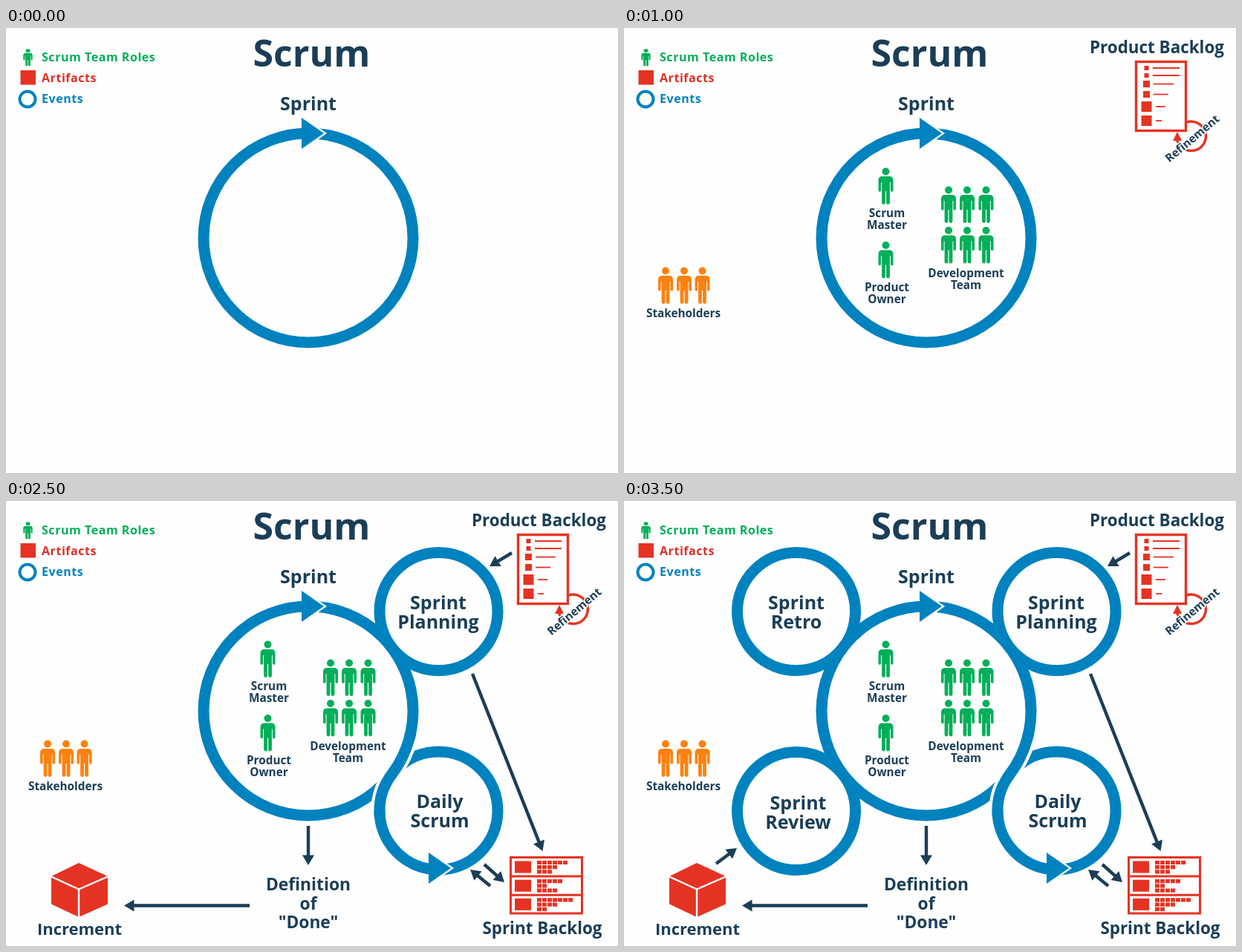
An HTML page that plays this animation: 824 by 600 pixels, repeating every 4 s.

```html
<!DOCTYPE html>
<html lang="en">
<head>
<meta charset="utf-8">
<title>Scrum</title>
<style>
  html, body { margin: 0; width: 100%; height: 100%; overflow: hidden; background: #fefefe; }
  svg { display: block; width: 824px; height: 600px; }
  text { font-family: "Open Sans", "Noto Sans", sans-serif; font-weight: 700; }
  .legend { letter-spacing: .55px; }
  .halo { paint-order: stroke; stroke: #fefefe; stroke-width: 3px; }
</style>
</head>
<body>
<svg id="stage" viewBox="0 0 824 600"></svg>
<script>
const WHITE = '#fefefe', BLUE = '#0082bf', DARK = '#1b3e57';
const GREEN = '#00af58', RED = '#e53323', ORANGE = '#fb8210';
const LOOP = 4000;

const text = (x, y, size, str) =>
  `<text x="${x}" y="${y}" font-size="${size}" fill="${DARK}" text-anchor="middle">${str}</text>`;

const legend = (y, str, fill) =>
  `<text class="legend" x="48" y="${y}" font-size="16" fill="${fill}">${str}</text>`;

const ring = (x, y, r, width = 15) =>
  `<circle cx="${x}" cy="${y}" r="${r}" fill="none" stroke="${BLUE}" stroke-width="${width}"/>`;

const rect = (x, y, w, h, attrs = `fill="${RED}"`) =>
  `<rect x="${x}" y="${y}" width="${w}" height="${h}" ${attrs}/>`;

const stroke = (d, color, width, extra = '') =>
  `<path d="${d}" fill="none" stroke="${color}" stroke-width="${width}" ${extra}/>`;

// Arrowhead lying on a ring, with a white gap in front of its tip.
const ringHead = (x, y) => [WHITE, BLUE].map((fill, i) =>
  `<path d="M${x + 4 - 4 * i} ${y - 21}l30 21l-30 21z" fill="${fill}"/>`).join('');

const person = (x, y, fill, scale = '1') =>
  `<g transform="translate(${x} ${y}) scale(${scale})" fill="${fill}"><circle cy="5.5" r="5"/>
  <path d="M-5 12H5Q10 12 10 17.5V31a1.8 1.8 0 0 1-3.6 0V20h-1V47.5a2.4 2.4 0 0 1-4.8 0V32h-1.2V47.5a2.4 2.4 0 0 1-4.8 0V20h-1V31a1.8 1.8 0 0 1-3.6 0V17.5Q-10 12-5 12z"/></g>`;

const people = (xs, y, fill) => xs.map(x => person(x, y, fill)).join('');

function arrow(x1, y1, x2, y2) {
  const length = Math.hypot(x2 - x1, y2 - y1);
  const angle = Math.atan2(y2 - y1, x2 - x1) * 180 / Math.PI;
  return `<path transform="translate(${x1} ${y1}) rotate(${angle})" fill="${DARK}"
    d="M0-2.2H${length - 12}V2.2H0zM${length - 13.5}-8L${length} 0L${length - 13.5} 8z"/>`;
}

const event = (x, y, textX, baseline, first, second) =>
  ring(x, y, 79.5) + text(textX, baseline, 25, first) + text(textX, baseline + 25.5, 25, second);

function base() {
  return text(411.5, 52, 50, 'Scrum') + text(407, 111, 25, 'Sprint') +
    person(29.5, 28, GREEN, '.62 .47') + legend(44.5, 'Scrum Team Roles', GREEN) +
    rect(19.5, 57, 20.5, 19.5) + legend(73, 'Artifacts', '#dc3026') +
    ring(29, 96, 10.5, 4) + legend(101, 'Events', BLUE) +
    ring(407, 283, 141) + ringHead(398, 142);
}

function team() {
  const dev = [437, 462, 487.5], size = 15.3;
  return person(352.5, 188, GREEN) + text(354, 255, size, 'Scrum') + text(354, 270.5, size, 'Master') +
    person(352.5, 287.5, GREEN) + text(354, 355, size, 'Product') + text(354, 371, size, 'Owner') +
    people(dev, 213, GREEN) + people(dev, 267.5, GREEN) +
    text(460.5, 336, size, 'Development') + text(460.5, 352, size, 'Team') +
    people([56, 81, 105.5], 322, ORANGE) + text(80, 390, size, 'Stakeholders');
}

function productBacklog() {
  // y, box size, line start, line end
  const items = [[54, 6, 712, 748], [64, 6, 712, 748], [75.5, 9, 713, 740],
    [89.5, 9, 713, 733], [106, 14, 716, 729], [125, 14, 716, 724]];
  return text(717.5, 34, 22.4, 'Product Backlog') +
    stroke('M758 127A19.7 19.7 0 1 1 745 152V148', RED, 3.5) +
    `<path d="M745 140l6 12h-12z" fill="${RED}"/>` +
    rect(689.5, 45.5, 67, 93, `fill="${WHITE}" stroke="${RED}" stroke-width="3.4"`) +
    items.map(([y, s, from, to]) =>
      rect(703.5 - s / 2, y - s / 2, s, s) + stroke(`M${from} ${y}H${to}`, RED, 1.8)).join('') +
    `<g class="halo" transform="translate(768.5 153) rotate(-40)">${text(0, 0, 15.3, 'Refinement')}</g>`;
}

function planning() {
  const rows = [[6, 4, 3], [5, 2, 4], [7, 4, 2]];
  const board = rows.map((counts, r) => {
    const top = 485.5 + 25.2 * r;
    return rect(685, top, 22, 16) + counts.map((n, i) =>
      stroke(`M715 ${top + 2 + 6.2 * i}h${n * 7 - 1}`, RED, 5.2, 'stroke-dasharray="6 1"')).join('');
  }).join('');
  return event(582.5, 149, 582, 146, 'Sprint', 'Planning') +
    arrow(681, 70, 651, 88) + arrow(628, 233, 722.5, 472) +
    rect(679.5, 480.5, 96, 75.5, `fill="none" stroke="${RED}" stroke-width="3"`) +
    stroke('M679 506H776M679 531.2H776', RED, 3) + board +
    text(722, 584, 22.4, 'Sprint Backlog');
}

function daily() {
  // The sprint ring flows over into the daily ring along an S curve.
  const flow = 'M543.2 319.5A141 141 0 0 1 519.2 368.9A79.5 79.5 0 0 0 503 417.5';
  return event(582.5, 417.5, 584, 414, 'Daily', 'Scrum') +
    stroke(flow, WHITE, 23) + stroke(flow, BLUE, 15, 'stroke-linecap="square"') + ringHead(569, 495) +
    arrow(644, 490, 671, 514) + arrow(652, 519, 625, 497);
}

function increment() {
  return arrow(407, 438, 407, 491) +
    ['Definition', 'of', '"Done"'].map((word, i) => text(407, 525 + 25.5 * i, 22.8, word)).join('') +
    arrow(328, 545.5, 159, 545.5) +
    `<path d="M98 488L137 506V543.5L98 561L61 543.5V506z" fill="${RED}"/>` +
    stroke('M60 506L98 523.5L138 506M98 523V562', WHITE, 2.4) +
    text(99, 585, 22, 'Increment');
}

const review = () => event(232, 418, 234.5, 416, 'Sprint', 'Review') + arrow(124, 489, 152, 468);
const retro = () => event(232, 149, 232, 146, 'Sprint', 'Retro');

const stage = document.getElementById('stage');
const steps = [base, team, productBacklog, planning, daily, increment, review, retro];
stage.innerHTML = steps.map(step => `<g>${step()}</g>`).join('');
const layers = [...stage.children];

const start = performance.now();
function draw() {
  const time = (performance.now() - start) % LOOP;
  layers.forEach((layer, i) => {
    layer.style.display = time >= i * LOOP / steps.length ? '' : 'none';
  });
  requestAnimationFrame(draw);
}
draw();
</script>
</body>
</html>
```
